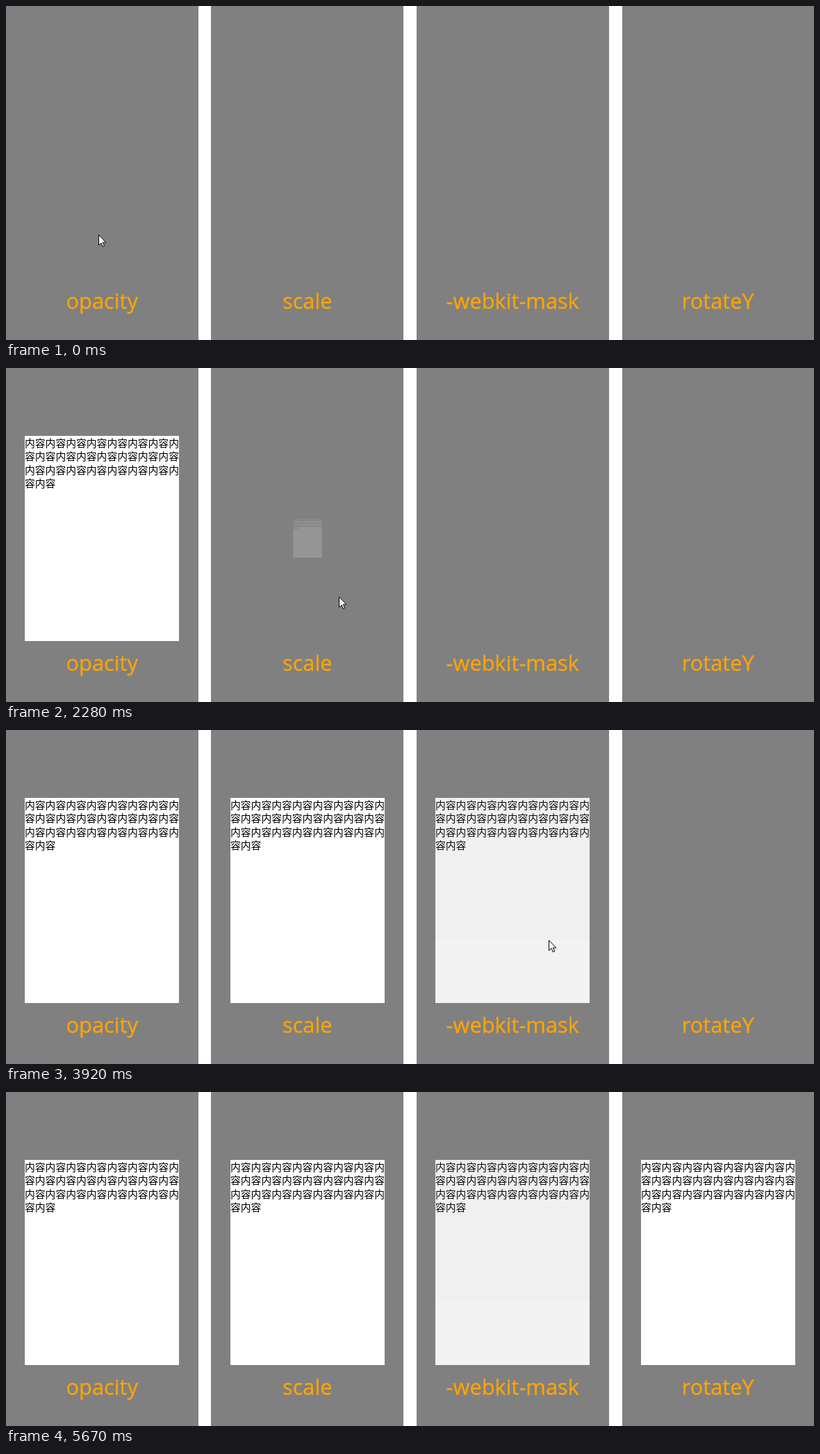
Write an HTML page that moves like this. It is 1163 by 482 pixels and loops after 5.92 s.

```html
<!DOCTYPE html>
<html lang="en">
<head>
<meta charset="utf-8">
<title>Card reveals</title>
<style>
  html, body { margin: 0; width: 100%; height: 100%; overflow: hidden; }
  #stage {
    position: relative; width: 1163px; height: 482px; overflow: hidden;
    background: repeating-linear-gradient(90deg, #808080 0 276.6px, #fff 0 295.5px);
  }
  #stage > * { position: absolute; }
  .label {
    top: 405px; width: 276.5px; text-align: center; color: #ffa500;
    font: 30.8px/40px "Open Sans", "Noto Sans", sans-serif;
    -webkit-text-stroke: .3px #ffa500;
  }
  .card {
    top: 98px; width: 222px; height: 296px; opacity: 0;
    background: #fff; color: #000; white-space: pre;
    font: 300 14.8px/19.4px "Noto Sans CJK SC", "Noto Sans CJK", sans-serif;
  }
  .masked {
    -webkit-mask-image: linear-gradient(rgba(0,0,0,.882) 205px, rgba(0,0,0,.9) 0);
    mask-image: linear-gradient(rgba(0,0,0,.882) 205px, rgba(0,0,0,.9) 0);
  }
  #cursor { left: 0; top: 0; overflow: visible; }
</style>
</head>
<body>
<div id="stage"></div>
<script>
const LOOP = 5920;
const WAKE = 1260;   // the first card appears
const STEP = 137;    // the picture advances in steps of this length
const PITCH = 295.5;
const CARD_INSET = 27.25;

const stage = document.getElementById("stage");
const copy = "内容".repeat(24).match(/.{1,15}/g).join("\n");

function add(className, left, text) {
  const el = document.createElement("div");
  el.className = className;
  el.style.left = left + "px";
  el.textContent = text;
  stage.append(el);
  return el;
}

const [fading, growing, masked, turning] =
  ["opacity", "scale", "-webkit-mask", "rotateY"].map((name, i) => {
    add("label", PITCH * i, name);
    return add("card", Math.round(PITCH * i + CARD_INSET), copy);
  });
masked.classList.add("masked");

stage.insertAdjacentHTML("beforeend", `
  <svg id="cursor" width="12" height="19">
    <path d="M.5 .5V15.2L4 12 6.3 17.3 8.6 16.3 6.3 11.2H10.8Z" fill="#fff" stroke="#000"/>
  </svg>`);

// Builds a paused animation; delays count from WAKE and tick() sets its time.
function reveal(el, delay, duration, easing, keyframes, fill = "forwards") {
  const animation = el.animate(keyframes, { delay, duration, easing, fill });
  animation.pause();
  return animation;
}

// Cursor stops: step number, x, y.
const stops = [
  [3, 133, 330], [5, 479, 330], [9, 479, 330], [11, 454, 323], [13, 662, 302], [17, 740, 302],
  [18, 740, 302], [19, 781, 303], [21, 1009, 291], [27, 1024, 293], [28, 1024, 293],
  [31, 1122, 441], [31.5, -50, -50]
];
const firstStop = stops[0][0];
const travel = stops.at(-1)[0] - firstStop;

const animations = [
  reveal(fading, -156, 1000, "ease", [
    { opacity: 0, transform: "translateY(72px)" },
    { opacity: 1, transform: "translateY(0)" }
  ]),
  reveal(growing, 903, 500, "linear", [
    { opacity: 0, transform: "scale(0)" },
    { opacity: 1, transform: "scale(1.1)", offset: .66 },
    { opacity: 1, transform: "scale(1)" }
  ]),
  reveal(masked, 2060, 260, "linear", [{ opacity: 0 }, { opacity: 1 }]),
  reveal(turning, 3145, 837, "ease-in-out", [
    { opacity: 1, transform: "perspective(417px) translateZ(-168px) rotateY(-130deg)" },
    { opacity: 1, transform: "perspective(417px) translateZ(0) rotateY(0)" }
  ]),
  reveal(document.getElementById("cursor"), firstStop * STEP, travel * STEP, "linear",
    stops.map(([step, x, y]) => ({
      offset: (step - firstStop) / travel,
      transform: `translate(${x}px, ${y}px)`,
      easing: "ease-out"
    })), "both")
];

const start = performance.now();
function tick() {
  const t = (performance.now() - start) % LOOP - WAKE;
  const time = t < 0 ? -LOOP : Math.floor(t / STEP) * STEP;
  for (const animation of animations) animation.currentTime = time;
  requestAnimationFrame(tick);
}
tick();
</script>
</body>
</html>
```
